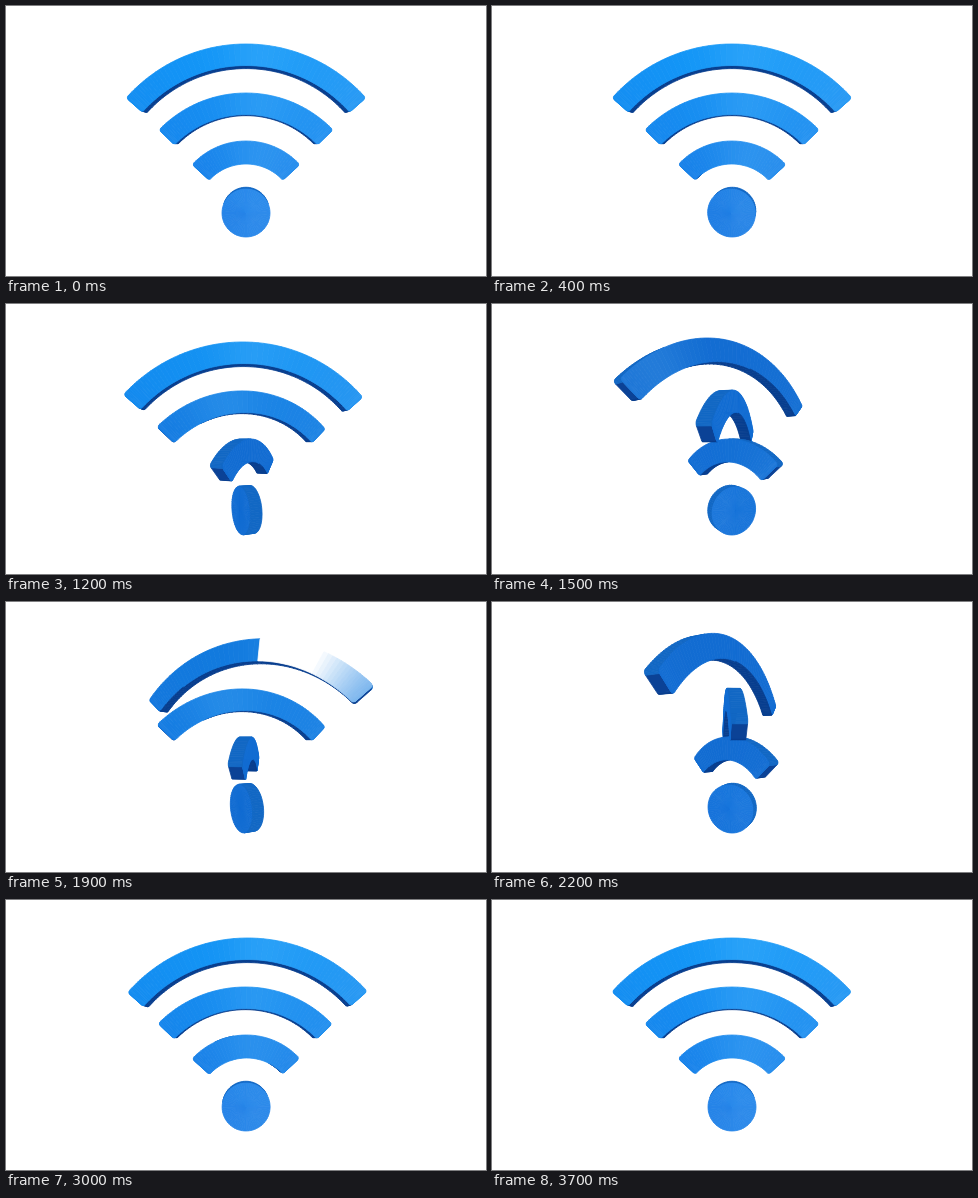
Write an HTML page with a canvas that moves like this. It is 480 px wide and 270 px high and loops after 3.8 s.

```html
<!DOCTYPE html>
<html lang="en">
<head>
<meta charset="utf-8">
<title>Spinning wireless symbol</title>
<style>
  html, body { margin: 0; width: 100%; height: 100%; overflow: hidden; background: #fff; }
  canvas { display: block; width: 480px; height: 270px; }
</style>
</head>
<body>
<canvas id="stage" width="480" height="270"></canvas>
<script>
const ctx = document.getElementById('stage').getContext('2d');
const LOOP = 3800, STEP = 100;
const CX = 240, CY = 138, DIST = 300, DEPTH = 12, CORNER = 3;
const FIT = 1 - DEPTH / 2 / DIST;   // keeps the front face at its drawn size

// cy: centre, r0/r1: inner and outer radius, w: half opening in degrees, lead: head start in ms
const parts = [
  { cy: 198, r0: 138.5, r1: 160, w: 48.5, lead: 0, n: 72 },
  { cy: 208, r0: 99.5, r1: 121, w: 46, lead: 130, n: 54 },
  { cy: 208, r0: 50, r1: 73, w: 47.5, lead: 370, n: 44 },
  { cy: 207, r0: 0, r1: 24, w: 180, lead: 560, n: 64 }
];

// One turn with a small wind-up and overshoot: degrees every 200 ms from 600 ms
const turn = [0, -2, -6, 4, 25, 68, 126, 187, 243, 288, 320, 344, 358, 364, 364, 361, 360];

const clamp = (v, a, b) => Math.min(b, Math.max(a, v));
const ramp = (v, a, b) => clamp((v - a) / (b - a), 0, 1);
const mix = (a, b, k) => a.map((v, i) => v + (b[i] - v) * k);
const rgb = c => `rgb(${c.map(Math.round)})`;

function angleAt(t) {
  const p = clamp((t - 600) / 200, 0, turn.length - 1);
  const i = Math.floor(p), f = p - i;
  const [a, b, c, d] = [-1, 0, 1, 2].map(k => turn[clamp(i + k, 0, turn.length - 1)]);
  return b + f / 2 * (c - a + f * (2 * a - 5 * b + 4 * c - d + f * (3 * (b - c) + d - a)));
}

// Glossy face: darker when turned, a soft streak, a white reflection on the upper right
function faceColor(x, y, a) {
  const tilt = Math.abs(Math.sin(a * Math.PI / 180));
  const rest = mix([18, 150, 247], [26, 122, 229], ramp(y, 50, 210));
  const base = mix(rest, [18, 108, 210], ramp(tilt, 0, 0.6));
  const streak = 0.15 * Math.exp(-(((x - 250 + 2 * a) / 36) ** 2)) + 0.2 * ramp(x, 220, 360) * (1 - tilt);
  const lo = 240 + (a + 34) * 1.25, hi = 312 - (a + 24) * 3;
  const white = ramp(a, -17, -22) * ramp(a, -72, -60) * ramp(y, 100, 93)
    * ramp(x, lo - 2, lo + 2) * ramp(x, hi + 80, hi);
  return mix(mix(base, [130, 208, 255], streak), [255, 255, 255], white);
}

function addPart(part, t, out) {
  const deg = angleAt(t + part.lead), th = deg * Math.PI / 180;
  const a = ((deg + 90) % 180 + 180) % 180 - 90;
  const sin = Math.sin(th), cos = Math.cos(th);
  const w = part.w * Math.PI / 180;

  function point(r, phi, z) {
    const x = r * Math.sin(phi) * FIT;
    const y = (part.cy - r * Math.cos(phi) - CY) * FIT;
    const rx = x * cos + z * sin, rz = z * cos - x * sin;
    const s = DIST / (DIST - rz);
    return { x: CX + rx * s, y: CY + y * s, far: Math.hypot(rx, y, DIST - rz) };
  }

  function quad(pts, color) {
    let area = 0, x = 0, y = 0, far = 0;
    pts.forEach((p, i) => {
      const q = pts[(i + 1) % 4];
      area += p.x * q.y - q.x * p.y;
      x += p.x / 4;
      y += p.y / 4;
      far += p.far / 4;
    });
    if (area > 0.01) out.push({ pts, far, color: rgb(color || faceColor(x, y, a)) });
  }

  // Rows crowd towards the ends, where the corners are rounded
  const rows = Array.from({ length: part.n + 1 }, (_, i) => {
    const u = 2 * i / part.n - 1, h = DEPTH / 2;
    const phi = part.r0 ? w * Math.sin(u * Math.PI / 2) : w * u;
    const gap = Math.max(0, CORNER - (w - Math.abs(phi)) * part.r1);
    const inset = part.r0 ? CORNER - Math.sqrt(Math.max(0, CORNER ** 2 - gap ** 2)) : 0;
    const r0 = part.r0 + inset, r1 = part.r1 - inset;
    return [point(r1, phi, h), point(r0, phi, h), point(r1, phi, -h), point(r0, phi, -h)];
  });
  const cap = [11, 66, 150];
  for (let i = 0; i < part.n; i++) {
    const [A, D, A2, D2] = rows[i], [B, C, B2, C2] = rows[i + 1];
    quad([A, B, C, D]);
    quad([D2, C2, B2, A2]);
    quad([A2, B2, B, A], [18, 104, 196]);
    if (part.r0) quad([D, C, C2, D2], [8, 62, 142]);
    if (part.r0 && i === 0) quad([A2, A, D, D2], cap);
    if (part.r0 && i === part.n - 1) quad([B, B2, C2, C], cap);
  }
}

function draw(t) {
  ctx.fillStyle = '#fff';
  ctx.fillRect(0, 0, 480, 270);
  ctx.lineWidth = 0.8;
  ctx.lineJoin = 'round';
  const quads = [];
  parts.forEach(p => addPart(p, t, quads));
  quads.sort((p, q) => q.far - p.far);
  for (const { pts, color } of quads) {
    ctx.fillStyle = ctx.strokeStyle = color;
    ctx.beginPath();
    pts.forEach(p => ctx.lineTo(p.x, p.y));
    ctx.closePath();
    ctx.fill();
    ctx.stroke();
  }
}

function tick() {
  const t = performance.now() % LOOP;
  draw(Math.floor(t / STEP) * STEP);
  requestAnimationFrame(tick);
}
tick();
</script>
</body>
</html>
```
